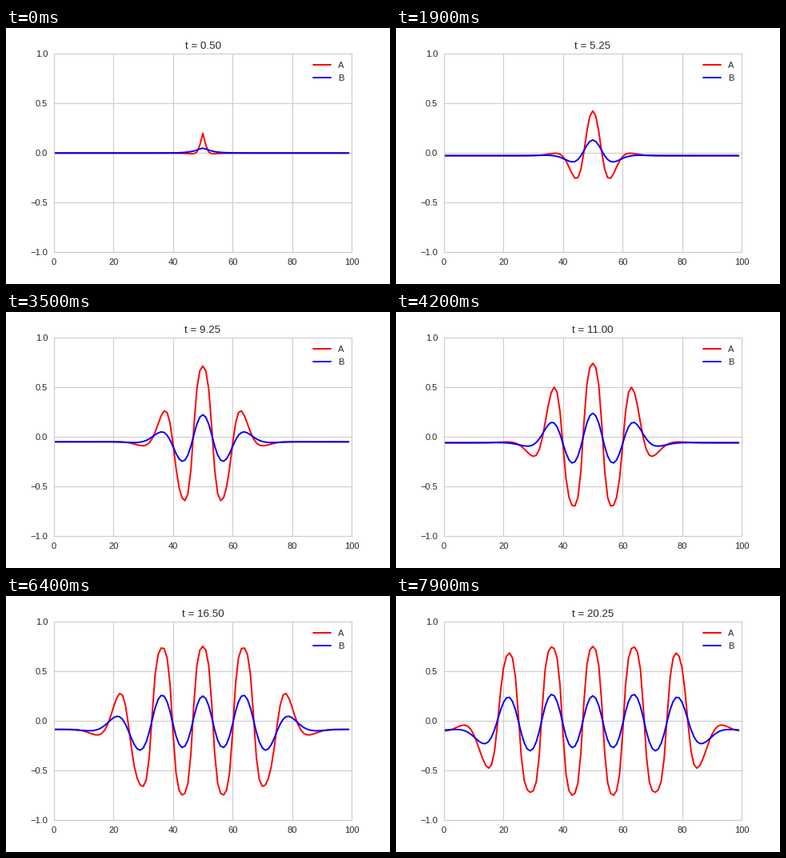
A matplotlib script that plays this animation: 480x320 px, repeating every 8000 ms.

```python
import numpy as np
import matplotlib.pyplot as plt
from matplotlib.animation import FuncAnimation

# One-dimensional activator/inhibitor system on a ring of cells
CELLS = 100
DIFF_A, DIFF_B = 1, 100
ALPHA, BETA = -0.005, 10
DT = 0.001
STEPS = 250          # integration steps per drawn frame
FRAMES, INTERVAL = 80, 100
FIRST = 2            # first drawn state, counted in frames from rest


def laplacian(u):
    return np.roll(u, 1) + np.roll(u, -1) - 2 * u


def simulate():
    a, b = np.zeros(CELLS), np.zeros(CELLS)
    a[CELLS // 2] = 0.3
    states = []
    for _ in range(FIRST + FRAMES - 1):
        for _ in range(STEPS):
            da = DIFF_A * laplacian(a) + a - a * a * a - b + ALPHA
            db = DIFF_B * laplacian(b) + BETA * (a - b)
            a, b = a + DT * da, b + DT * db
        states.append((a, b))
    return states[FIRST - 1:]


INK, GRID = "0.15", "0.8"
plt.rcParams.update({
    "font.family": "Liberation Sans",
    "font.size": 10,
    "text.color": INK,
    "axes.edgecolor": GRID,
    "axes.linewidth": 1,
    "axes.axisbelow": True,
    "axes.grid": True,
    "grid.color": GRID,
    "grid.linewidth": 1,
    "lines.linewidth": 1.75,
    "lines.solid_capstyle": "round",
    "xtick.major.size": 0,
    "ytick.major.size": 0,
    "xtick.major.pad": 7,
    "ytick.major.pad": 7,
    "xtick.color": INK,
    "ytick.color": INK,
})

states = simulate()

fig = plt.figure(figsize=(6, 4), dpi=80, facecolor="white")
ax = fig.add_axes([0.125, 0.125, 0.775, 0.775])
ax.set(xlim=(0, 100), ylim=(-1, 1),
       xticks=np.arange(0, 101, 20), yticks=np.arange(-1, 1.1, 0.5))

cells = np.arange(CELLS)
line_a, = ax.plot(cells, states[0][0], color="r", label="A")
line_b, = ax.plot(cells, states[0][1], color="b", label="B")
ax.legend(loc="upper right", frameon=False, fontsize=10)
title = ax.set_title("", fontsize=12, pad=5)


def draw(i):
    a, b = states[i]
    line_a.set_ydata(a)
    line_b.set_ydata(b)
    title.set_text(f"t = {(FIRST + i) * STEPS * DT:.2f}")
    return line_a, line_b, title


anim = FuncAnimation(fig, draw, frames=FRAMES, interval=INTERVAL,
                     repeat=True, repeat_delay=0)
plt.show()
```
